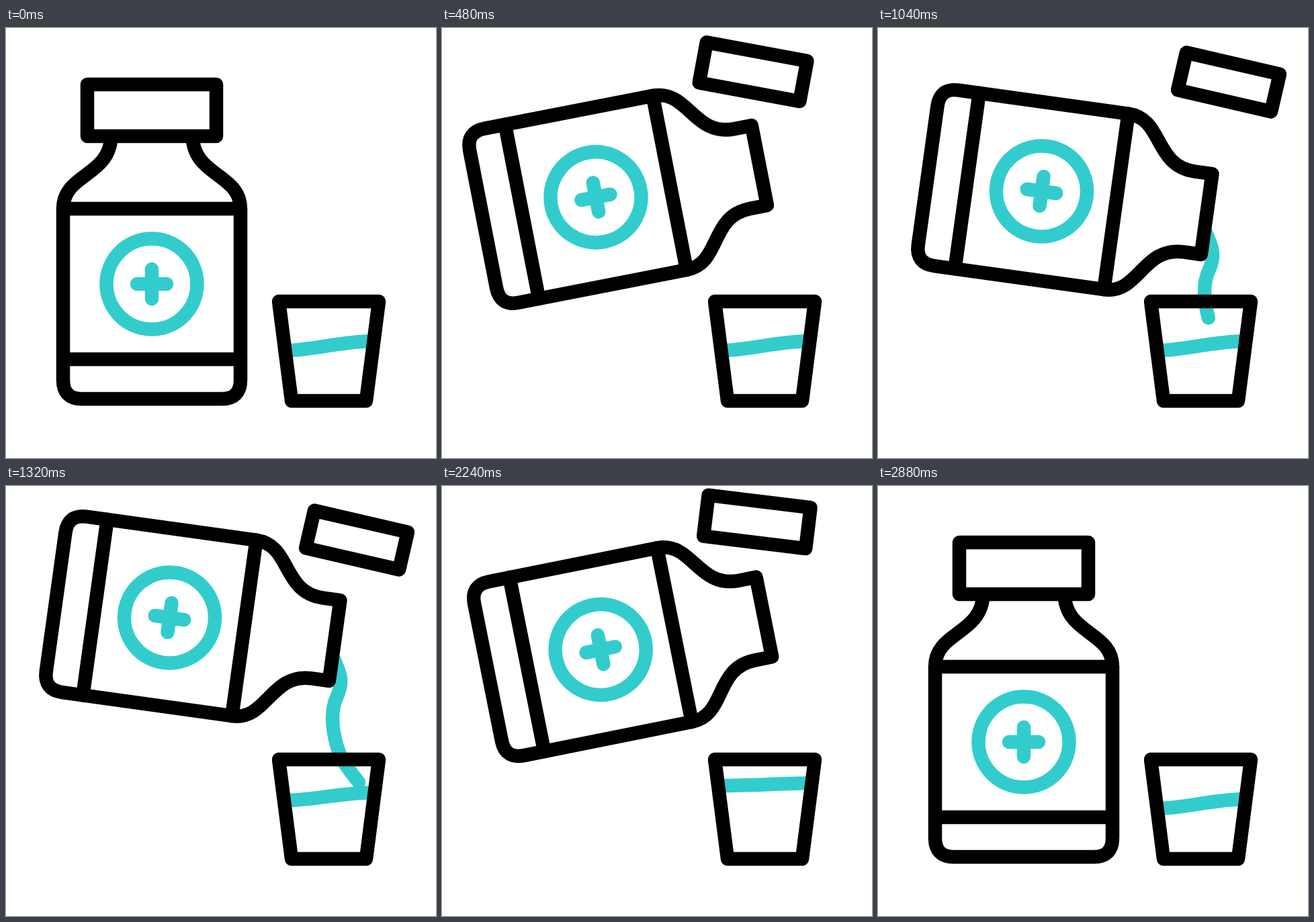
Animation, 640 px wide and 640 px high, one loop 3 s. Source, as an HTML page with a canvas:

```html
<!DOCTYPE html>
<html lang="en">
<head>
<meta charset="utf-8">
<title>Pouring a dose</title>
<style>
html, body { margin: 0; width: 100%; height: 100%; overflow: hidden; background: #fff; }
canvas { display: block; }
</style>
</head>
<body>
<canvas id="stage" width="640" height="640"></canvas>
<script>
const ctx = document.getElementById('stage').getContext('2d');
const LOOP = 3000, STEP = 40, BLACK = '#000', TEAL = '#33cccc';

const bottle = new Path2D(
  'M-60.5 -248H60.5V-222C60.5 -160 132 -165 132 -112V143Q132 171 104 171' +
  'H-104Q-132 171 -132 143V-112C-132 -165 -60.5 -160 -60.5 -222Z');
const bands = new Path2D('M-132 -112H132M-132 112H132');
const badge = new Path2D('M67.5 0A67.5 67.5 0 1 1 -67.5 0A67.5 67.5 0 1 1 67.5 0ZM-22 0H22M0 -22V22');
const cup = new Path2D('M406 407H555L536 555H425Z');
const stream = new Path2D('M486 300C500 330 502 340 492 362S486 410 492 432S507 465 525 488');

const linear = (t, a, b) => Math.min(1, Math.max(0, (t - a) / (b - a)));
const sine = (t, a, b) => (1 - Math.cos(Math.PI * linear(t, a, b))) / 2;
const blend = (t, a, b, ease) => linear(t, a, b) * (1 - ease) + sine(t, a, b) * ease;

function line(path, color) {
  ctx.strokeStyle = color;
  ctx.stroke(path);
}

// Pose of bottle and cap on the way to the cup
function lift(t) {
  const p = blend(t, 80, 610, 0.5);
  const rise = 138 * (p + 1.27 * p ** 3 * (1 - p));
  const bob = 32 * sine(t, 1440, 1840) - 65 * sine(t, 1100, 1440);
  return {
    x: 217 + 26.5 * p ** 3.7, y: 381 - rise + bob, turn: 97.9 * p,
    capX: 217 + 305 * p, capY: 122.5 - 42 * p - 150 * p * (1 - p),
    capTurn: 13 * p, capSize: 1 - 0.257 * p
  };
}

// Pose on the way back
function lower(t) {
  const p = blend(t, 2040, 2880, 0.4), q = 1 - p;
  const c = q * (1 + 0.14 * p);
  return {
    x: 217 + 26 * q ** 1.4, y: 381 - 171 * q * (1 - p ** 5), turn: 97.9 * q,
    capX: 217 + 305 * c, capY: 122.5 - 42 * c - 290 * c * c * (1 - c),
    capTurn: 13 * c ** 3.3, capSize: 1 - 0.257 * c ** 1.25
  };
}

function place(x, y, degrees, paint) {
  ctx.save();
  ctx.translate(x, y);
  ctx.rotate(degrees * Math.PI / 180);
  paint();
  ctx.restore();
}

function drawStream(t, bottleY, surface) {
  const head = Math.min(210, 0.4 * (t - 700));
  const tail = Math.max(0, 0.45 * (t - 1493));
  if (head <= 0 || tail > 185) return;
  ctx.save();
  ctx.beginPath();
  ctx.rect(0, 0, 640, surface);
  ctx.clip();
  ctx.translate(0, bottleY - 243);
  ctx.setLineDash([head - tail, 999]);
  ctx.lineDashOffset = -tail;
  line(stream, TEAL);
  ctx.restore();
}

function drawLiquid(left, right) {
  ctx.lineCap = 'butt';
  line(new Path2D(`M415 ${left}C455 ${left} 495 ${right + 1} 545 ${right}`), TEAL);
  ctx.lineCap = 'round';
}

function drawBottle() {
  ctx.fill(bottle);
  line(bands, BLACK);
  line(bottle, BLACK);
  line(badge, TEAL);
}

function drawCap(size) {
  const w = 192 * size, h = 77 * size;
  const box = new Path2D();
  box.rect(-w / 2, -h / 2, w, h);
  ctx.fill(box);
  line(box, BLACK);
}

function draw(t) {
  const pose = t < 2040 ? lift(t) : lower(t);
  const level = sine(t, 1100, 1720) - sine(t, 2065, 2644);
  const settle = 5 * level * sine(t, 1640, 1920);
  const left = 480 - 43 * level, right = 466 - 35 * level + settle;
  ctx.fillStyle = '#fff';
  ctx.fillRect(0, 0, 640, 640);
  ctx.lineWidth = 20.5;
  ctx.lineCap = ctx.lineJoin = 'round';
  drawStream(t, pose.y, right + 3);
  drawLiquid(left, right);
  line(cup, BLACK);
  place(pose.x, pose.y, pose.turn, drawBottle);
  place(pose.capX, pose.capY, pose.capTurn, () => drawCap(pose.capSize));
}

const start = performance.now();
function tick() {
  const t = (performance.now() - start) % LOOP;
  draw(Math.floor(t / STEP) * STEP);
  requestAnimationFrame(tick);
}
tick();
</script>
</body>
</html>
```
